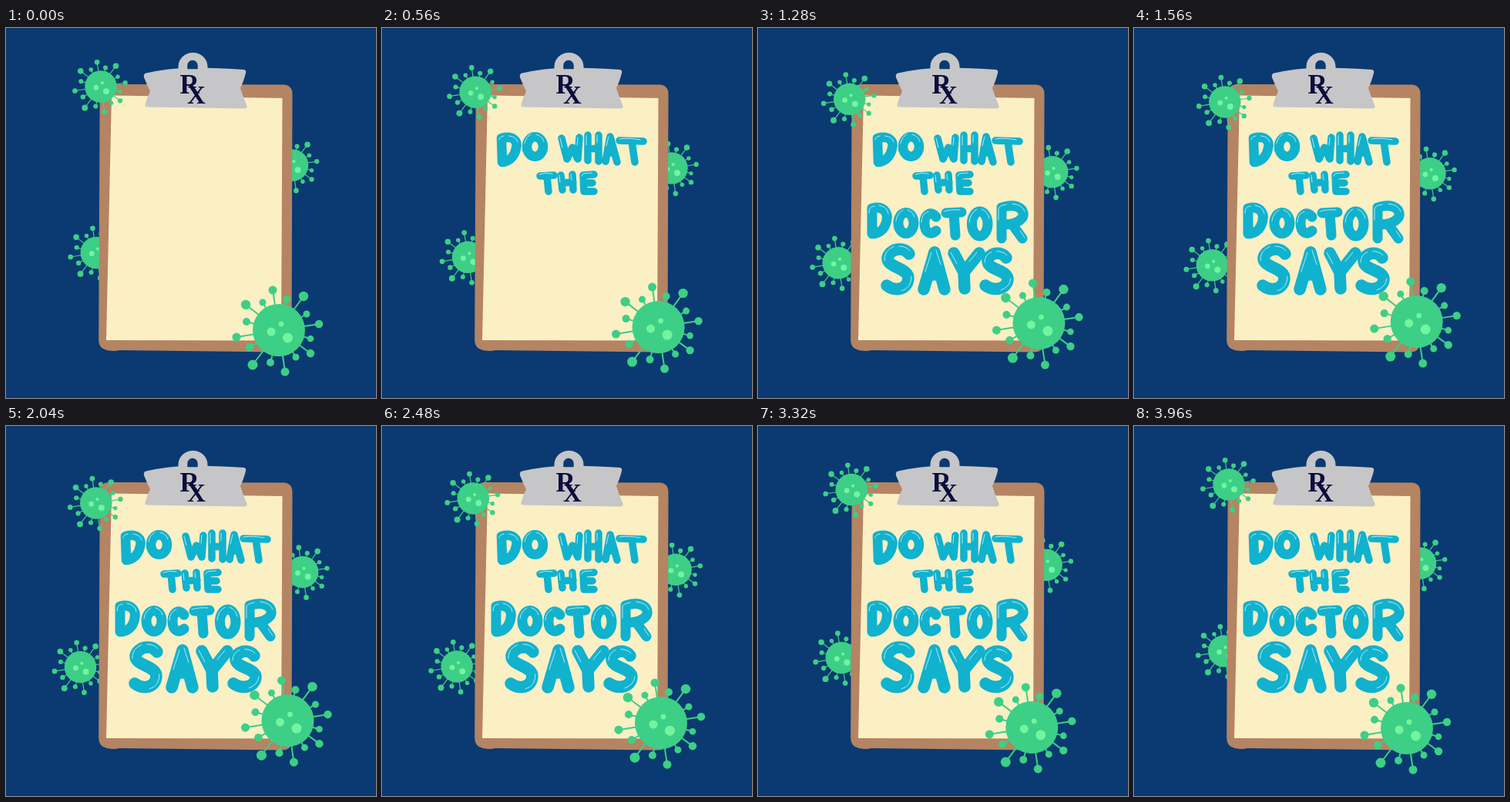
An HTML page with a canvas for the animation above (4000 ms loop, 480 by 480 pixels).

```html
<!DOCTYPE html>
<html lang="en">
<head>
<meta charset="utf-8">
<title>Do what the doctor says</title>
<style>
html, body { margin: 0; width: 100%; height: 100%; overflow: hidden; background: #0a3a71; }
canvas { display: block; width: 100vw; height: 100vh; }
</style>
</head>
<body>
<canvas id="stage" width="480" height="480"></canvas>
<script>
const ctx = document.getElementById('stage').getContext('2d');
const LOOP = 4000, STEP = 40;
const color = {
  sky: '#0a3a71', board: '#b48463', paper: '#fbefc4', clip: '#c6c6c8',
  ink: '#0b0c3a', germ: '#3dcf86', spot: '#72f59f', word: '#10b2ce', gloss: '#b4e8ee'
};

const board = new Path2D(`M133 73 L360 73.5 Q371.5 74 371.5 86 L370.5 409 Q370 420.5 358 420.5
  L147 418 Q141 420 131 418 Q120.5 416 120.2 405 L121.7 84 Q122 74 133 73 Z`);
const paper = new Path2D('M137 87.5 L358.5 91 L357 405.5 L130 405 Z');
const clip = new Path2D(`M182 58.5 Q211 52 240 51.5 Q276 51.5 309 54 Q312 55 311 58.5 Q308 70 304 78
  Q308 90 312.5 101 Q313 105 308.5 104.5 L183 102.5 Q179 102 181 98 Q183 90 187 82 Q183 74 179 64 Q178 59 182 58.5 Z`);
const ring = new Path2D('M223.5 58 V50 A19 18 0 0 1 261.5 50 V58 Z');
const hole = new Path2D('M235.3 53.3 V48.5 A6.7 6.7 0 0 1 248.7 48.5 V53.3 Z');

// Spikes around a germ of radius 34: x, y, knob radius
const spikes = [
  [-8, -52, 5.5], [32, -44, 6.2], [-43, -33, 6.2], [-21, -36, 4.5],
  [10, -40, 5], [36, -21, 4.5], [52, -8, 5.2], [41, 11, 4.3],
  [41, 30, 5.2], [22, 35, 4.5], [8, 54, 5.5], [-11, 42, 5],
  [-34, 45, 6.5], [-38, 22, 5.2], [-55, 9, 5.5], [-42, -11, 5]
];
const spots = [[-10, 2, 5.5], [3, -8, 3.4], [11.5, 10, 6.5]];

// Each germ drifts from x, y by dx, dy until peak, then returns by end
const behind = [
  { x: 371.5, y: 178, dx: 14.7, dy: 12.8, peak: 1850, end: 3640, size: .61 },
  { x: 117.3, y: 291.5, dx: -23, dy: 23.5, peak: 2260, end: 4000, size: .61 }
];
const front = [
  { x: 123, y: 76, dx: -6.5, dy: 25, peak: 1960, end: 3800, size: .61 },
  { x: 354, y: 392, dx: 14, dy: -12, peak: 1720, end: 3480, size: 1 }
];

const words = [
  { at: 200, width: 12.5,
    shape: `M155 143 C169 139 177 146 174 156 C172 167 165 173 156 174 Z
      M209 154 A10.5 12.7 0 1 1 188 154 A10.5 12.7 0 1 1 209 154`,
    gloss: 'M152 145 Q152 141 158 140 M165 140 Q174 141 176 148 M185 150 Q186 142 193 138 M200 138 Q208 140 210 147' },
  { at: 200, width: 9.5,
    shape: `M233 143 L240 170 L247 155 L254 170 L256 142
      M267 139 L267 172 M281 139 L281 173 M267 157 L281 156
      M296 141 L290 173 M296 141 L305 174 M292 162 L302 162
      M308 146 L339 147 M324 147 L328 174`,
    gloss: `M231 143 L234 155 M254 142 L253 152 M265 139 L265 152 M279 139 L279 149
      M294 141 L291 153 M308 144 Q320 142 335 145` },
  { at: 400, width: 9.5,
    shape: `M205 192 L223 191 M214 192 L216 212
      M232 191 L234 210 M247 190 L248 210 M234 201 L248 200
      M275 190 L261 191 L262 212 L275 212 M262 201 L273 201`,
    gloss: 'M204 190 Q212 187 221 189 M230 191 L231 200 M245 190 L246 197 M259 192 Q259 189 263 188.5 L272 188' },
  { at: 600, width: 13,
    shape: `M148 234 C162 230 169 239 167 249 C165 261 157 267 148 267 Z
      M202 253 A10 13.5 0 1 1 182 253 A10 13.5 0 1 1 202 253
      M231 245 C225 237 216 241 216 253 C216 266 224 269 231 263
      M244 240 L264 239 M254 240 L256 269
      M298 254 A10.3 16 0 1 1 277.4 254 A10.3 16 0 1 1 298 254
      M316 273 L316 233 C336 226 348 236 343 246 C338 253 328 255 317 255 M330 255 L343 273`,
    gloss: `M144 240 Q144 231 151 231 M157 230 Q168 232 169 241
      M179 250 Q180 241 188 236 M194 236 Q201 238 203 245
      M212 252 Q212 241 221 238 M241 238 Q250 235 262 236
      M274 252 Q275 240 284 235 M290 235 Q298 238 300 247
      M312 249 L312 234 Q314 230 322 229 M330 228 Q343 229 346 238 M340 263 L346 272` },
  { at: 800, width: 15.5,
    shape: `M196 293 C189 283 171 286 168 298 C167 311 196 311 195 325 C194 340 177 342 167 334
      M229 291 L215 339 M229 291 L242 339 M222 320 L236 320
      M254 292 L267 317 L268 338 M287 292 L267 317
      M322 298 C315 288 298 292 298 303 C299 314 324 314 324 326 C323 339 306 342 295 334`,
    gloss: `M164 302 Q163 289 176 283.5 M183 283 Q192 283 197 289 M199 322 Q199 338 186 341
      M225 291 L217 316 M231 288 L237 307 M250 291 L258 306 M284 291 L274 303
      M294 304 Q294 294 303 290.5 M310 289.5 Q319 290 323 295 M328 325 Q327 336 315 340` }
].map(w => ({ ...w, shape: new Path2D(w.shape), gloss: new Path2D(w.gloss) }));

function fill(path, style) {
  ctx.fillStyle = style;
  ctx.fill(path);
}

function stroke(path, style, width) {
  ctx.strokeStyle = style;
  ctx.lineWidth = width;
  ctx.stroke(path);
}

function dot(x, y, r, style) {
  ctx.fillStyle = style;
  ctx.beginPath();
  ctx.arc(x, y, r, 0, Math.PI * 2);
  ctx.fill();
}

function letter(char, x, y, size) {
  ctx.fillStyle = color.ink;
  ctx.font = `bold ${size}px "Liberation Serif", serif`;
  ctx.fillText(char, x, y);
}

function drawGerm(g, t) {
  const k = t < g.peak ? t / g.peak : Math.max(0, (g.end - t) / (g.end - g.peak));
  ctx.save();
  ctx.translate(g.x + g.dx * k, g.y + g.dy * k);
  ctx.scale(g.size, g.size);
  ctx.strokeStyle = color.germ;
  ctx.lineWidth = 2;
  for (const [x, y, r] of spikes) {
    ctx.beginPath();
    ctx.moveTo(0, 0);
    ctx.lineTo(x, y);
    ctx.stroke();
    dot(x, y, r, color.germ);
  }
  dot(0, 0, 34, color.germ);
  for (const [x, y, r] of spots) dot(x, y, r, color.spot);
  ctx.restore();
}

function drawClipboard() {
  fill(board, color.board);
  fill(paper, color.paper);
  fill(ring, color.clip);
  fill(clip, color.clip);
  fill(hole, color.sky);
  letter('R', 225.5, 84.8, 35);
  letter('X', 235, 98, 33);
}

function drawWords(t) {
  ctx.lineCap = ctx.lineJoin = 'round';
  for (const w of words) {
    if (t < w.at) continue;
    stroke(w.shape, color.word, w.width);
    stroke(w.gloss, color.gloss, 1);
  }
}

function draw(t) {
  ctx.fillStyle = color.sky;
  ctx.fillRect(0, 0, 480, 480);
  for (const g of behind) drawGerm(g, t);
  drawClipboard();
  drawWords(t);
  for (const g of front) drawGerm(g, t);
}

function tick() {
  const t = performance.now() % LOOP;
  draw(Math.floor(t / STEP) * STEP);
  requestAnimationFrame(tick);
}
tick();
</script>
</body>
</html>
```
